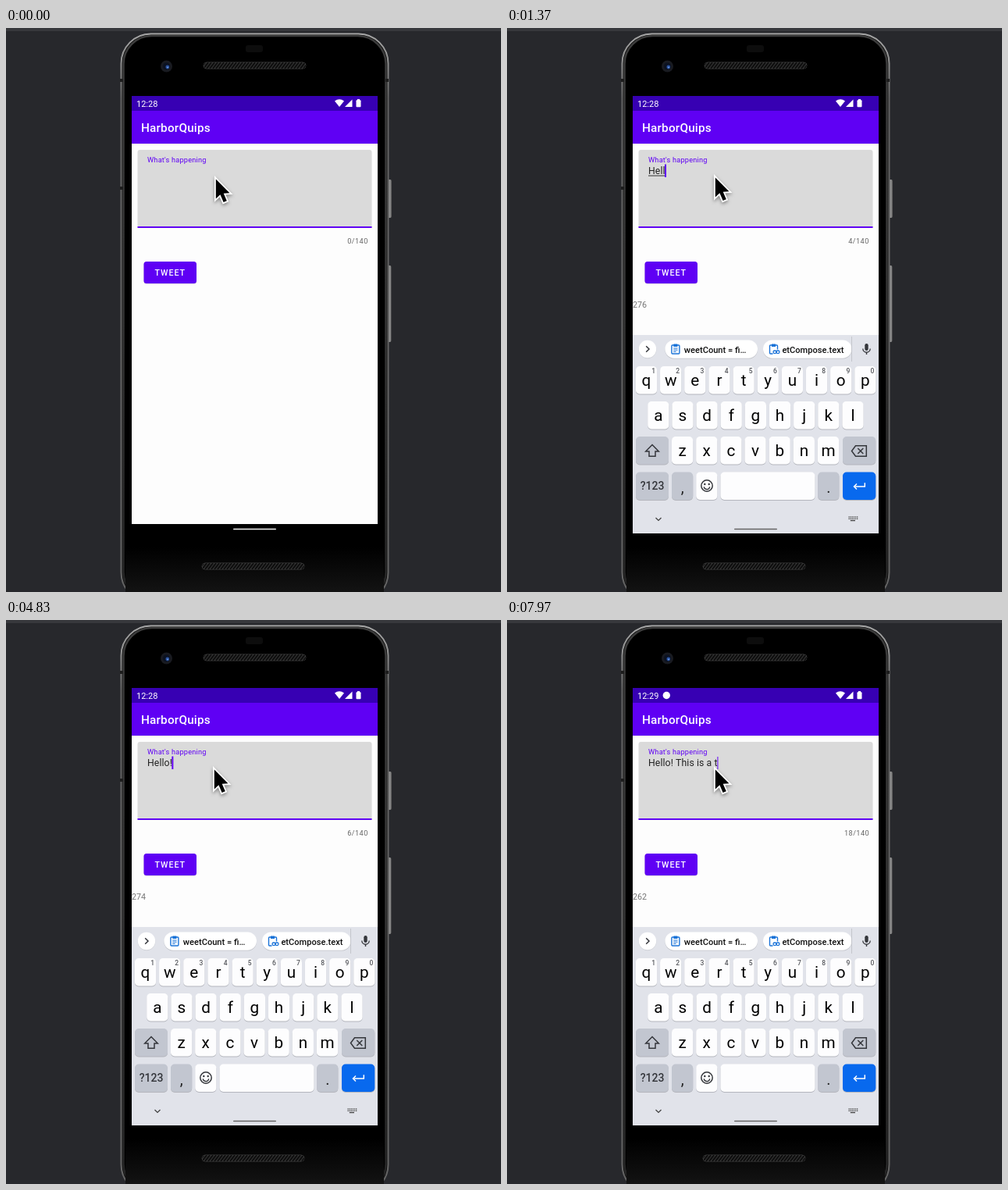
An HTML page with a canvas for the animation above (8 s loop, 634x722 px).

```html
<!DOCTYPE html>
<html lang="en">
<head>
<meta charset="utf-8">
<title>Typing on a phone</title>
<style>
html, body { margin: 0; width: 100%; height: 100%; overflow: hidden; background: #27282c; }
canvas { display: block; width: 634px; height: 722px; }
</style>
</head>
<body>
<canvas id="stage" width="634" height="722"></canvas>
<script>
const ctx = document.getElementById('stage').getContext('2d');
const LOOP = 8000;
const PURPLE = '#5f00f4';
const INK = '#34363b';
const MESSAGE = 'Hello! This is a t';
const KEY_TIMES = [500, 740, 980, 1220, 1480, 2460, 5430, 5660, 5890,
  6120, 6350, 6580, 6800, 7020, 7250, 7480, 7710, 7930];
const CLOCK_CHANGE = 7000;

const clamp = v => Math.max(0, Math.min(1, v));
const progress = (t, start, end) => clamp((t - start) / (end - start));

function rect(x, y, w, h, fill) {
  ctx.fillStyle = fill;
  ctx.fillRect(x, y, w, h);
}

function round(x, y, w, h, r, fill, stroke, width = 1) {
  ctx.beginPath();
  ctx.roundRect(x, y, w, h, r);
  if (fill) { ctx.fillStyle = fill; ctx.fill(); }
  if (stroke) { ctx.strokeStyle = stroke; ctx.lineWidth = width; ctx.stroke(); }
}

function circle(x, y, r, fill, stroke, width) {
  round(x - r, y - r, 2 * r, 2 * r, r, fill, stroke, width);
}

function arc(x, y, r, start, end, color, width) {
  ctx.beginPath();
  ctx.arc(x, y, r, start, end);
  ctx.strokeStyle = color;
  ctx.lineWidth = width;
  ctx.stroke();
}

function trace(points) {
  ctx.beginPath();
  for (let i = 0; i < points.length; i += 2) ctx.lineTo(points[i], points[i + 1]);
}

function line(points, color, width = 1.6, close = false) {
  trace(points);
  if (close) ctx.closePath();
  ctx.strokeStyle = color;
  ctx.lineWidth = width;
  ctx.stroke();
}

function polygon(points, color) {
  trace(points);
  ctx.fillStyle = color;
  ctx.fill();
}

function text(str, x, y, size, color, { weight = 400, spacing = 0, align = 'left' } = {}) {
  ctx.font = `${weight} ${size}px Roboto, sans-serif`;
  ctx.letterSpacing = spacing + 'px';
  ctx.textAlign = align;
  ctx.fillStyle = color;
  ctx.fillText(str, x, y);
  return ctx.measureText(str).width;
}

function gradient(x0, y0, x1, y1, ...colors) {
  const g = ctx.createLinearGradient(x0, y0, x1, y1);
  colors.forEach((c, i) => g.addColorStop(i / (colors.length - 1), c));
  return g;
}

function speaker(x, y) {
  round(x, y, 131, 8, 4, '#292929', '#3c3c3c');
  ctx.save();
  ctx.clip();
  for (let i = 0; i < 136; i += 4) line([x + i - 4, y + 8, x + i + 2, y], '#080808', 1.3);
  ctx.restore();
}

function drawPhone() {
  rect(0, 0, 634, 722, '#27282c');
  rect(0, 0, 634, 4, '#37383c');
  const side = gradient(489, 0, 494, 0, '#3a3a3a', '#989898', '#505050');
  round(488, 194, 6, 49, 2, side);
  round(488, 304, 5.5, 98, 2, side);

  round(147.5, 7.5, 342, 727.5, 38, '#111', gradient(0, 6, 0, 90, '#a8a8a8', '#8c8c8c', '#656565'), 2);
  round(150.5, 10, 336, 722.5, 36, '#000', gradient(0, 9, 0, 722, '#3c3c3c', '#353535', '#252525'), 2.5);
  rect(153, 664, 331, 58, gradient(0, 664, 0, 722, '#000', '#131313'));
  for (const y of [65, 203]) rect(146, y, 4, 4, '#1d1d1d');
  rect(486, 65, 4, 4, '#1d1d1d');

  round(307, 22, 22, 9, 3, '#0d0d0d');
  circle(205.5, 49, 7.5, '#191b21');
  circle(205.5, 49, 4.5, '#0b1222');
  circle(206.8, 50, 2.4, '#29509b');
  circle(207, 50.4, 0.9, '#7aa5e8');
  speaker(253, 44);
  speaker(251, 685);
}

function drawStatusBar(t) {
  const late = t >= CLOCK_CHANGE;
  rect(161, 87, 315, 19, '#3700b3');
  text(late ? '12:29' : '12:28', 167, 100.6, 11, '#fff');
  if (late) circle(204.3, 96.5, 4.7, '#fff');
  ctx.beginPath();
  ctx.moveTo(427, 101);
  ctx.lineTo(421, 93.6);
  ctx.quadraticCurveTo(427, 89, 433, 93.6);
  ctx.fillStyle = '#fff';
  ctx.fill();
  polygon([434, 101, 443.5, 101, 443.5, 91.5], '#fff');
  round(448.5, 92.2, 6, 9, 1, '#fff');
  rect(450, 91, 3, 2, '#fff');
}

// Characters entered by time t and the time since the last one.
function typed(t) {
  const count = KEY_TIMES.filter(k => k <= t).length;
  return { count, since: t - (count ? KEY_TIMES[count - 1] : 330) };
}

function drawMessage(t) {
  const { count, since } = typed(t);
  const message = MESSAGE.slice(0, count);
  const end = 181 + text(message, 181, 187.4, 12.26, '#222', { spacing: 0.1 });

  // The word being composed is underlined shortly after its first letter.
  const start = message.lastIndexOf(' ') + 1;
  const word = message.slice(start);
  if (word && !word.endsWith('!') && t - KEY_TIMES[start] > 80 && since < 900) {
    const width = ctx.measureText(word).width;
    rect(end - width, 188.6, width, 1, '#333');
  }
  if (since >= 0 && since % 1000 < 500) {
    if (since < 40) rect(end - 0.2, 175, 1, 16, PURPLE);
    else rect(end - 0.6, 174.5, 2, 16.5, PURPLE);
  }
  if (count) text(String(280 - count), 161, 358.2, 10.7, '#757575');
}

function drawApp(t) {
  rect(161, 87, 315, 548, '#fdfdfd');
  rect(161, 148, 315, 2, gradient(0, 148, 0, 150, '#e4e2ea', '#fdfdfd'));
  rect(161, 106, 315, 42, PURPLE);
  drawStatusBar(t);
  text('HarborQuips', 173, 133, 15.3, '#fff', { weight: 500, spacing: 0.19 });

  round(168.5, 156, 300, 99, [3, 3, 0, 0], '#dadada');
  rect(168.5, 254, 300, 2, PURPLE);
  text("What's happening", 181, 172, 9.2, PURPLE, { spacing: 0.21 });

  const { count } = typed(t);
  text(count + '/140', count > 9 ? 432 : 437.3, 276.3, 9.2, '#666', { spacing: 0.4 });
  round(176.5, 299.5, 67.5, 28, 3.5, '#c9c9cd');
  round(176.5, 299, 67.5, 28, 3.5, PURPLE);
  text('TWEET', 190.5, 317, 10.7, '#fff', { weight: 500, spacing: 0.96 });
  drawMessage(t - 20);
}

function key(x, y, w, color = '#fdfdfe') {
  round(x, y + 1, w, 35.5, 5, '#b4b6bd');
  round(x, y, w, 35.5, 5, color);
}

function letterRow(letters, firstCenter, y, upper) {
  [...letters].forEach((ch, i) => {
    const x = firstCenter + i * 31.15;
    key(x - 13.6, y, 27.2);
    text(upper ? ch.toUpperCase() : ch, x, y + 24.5, 20.7, '#000', { align: 'center' });
  });
}

function clipboard(x, y, linked) {
  const blue = '#1a73d8';
  round(x - 5, y - 5, 10, 11, 1, null, blue, 1.4);
  rect(x - 2.5, y - 6.5, 5, 3.5, blue);
  if (linked) {
    rect(x - 1, y + 0.5, 8, 7, '#fff');
    round(x - 0.5, y + 2, 4, 3.6, 1.8, null, blue, 1.3);
    round(x + 3.5, y + 2, 4, 3.6, 1.8, null, blue, 1.3);
  } else {
    for (const dy of [-1.5, 0.7, 2.9]) rect(x - 2.7, y + dy, dy > 2 ? 3.5 : 5.4, 1, blue);
  }
}

function chip(x, width, label, linked) {
  round(x, 400.2, width, 23.4, 11.7, '#c3c5cb');
  round(x, 399.4, width, 23.4, 11.7, '#fff');
  clipboard(x + 13.5, 411, linked);
  text(label, x + 24.4, 415.6, 11.1, '#111', { weight: 500 });
}

function drawSuggestions(t) {
  circle(180, 411.8, 11.4, '#cfd1d7');
  circle(180, 411, 11.2, '#fff');
  line([178.2, 407.2, 182, 411, 178.2, 414.8], INK, 1.5);
  ctx.globalAlpha = progress(t, 280, 380);
  chip(202.4, 118.6, 'weetCount = fi…', false);
  chip(328, 113.5, 'etCompose.text', true);
  ctx.globalAlpha = 1;
  rect(441, 395, 1, 32, '#c4c6cc');
  round(458.3, 404, 4.4, 9, 2.2, INK);
  arc(460.5, 410.5, 4.7, 0, Math.PI, INK, 1.3);
  rect(459.8, 415, 1.4, 3, INK);
}

function drawKeyboard(t) {
  const slide = 254 * (1 - progress(t, 33, 333)) ** 3;
  const upper = (t > 240 && t < 585) || (t > 5470 && t < 5740);
  const grey = '#c2c6d0';
  ctx.save();
  ctx.beginPath();
  ctx.rect(161, 87, 315, 560);
  ctx.clip();
  ctx.translate(0, slide);
  rect(161, 393, 315, 256, '#e1e3ea');
  drawSuggestions(t);

  letterRow('qwertyuiop', 178.5, 433, upper);
  for (let i = 0; i < 10; i++) {
    text((i + 1) % 10, 187.6 + i * 31.15, 441.8, 8.5, '#55575c', { weight: 500, align: 'center' });
  }
  letterRow('asdfghjkl', 193.8, 478, upper);
  letterRow('zxcvbnm', 224.6, 523, upper);

  key(165, 523, 42, grey);
  const arrow = [186, 533.5, 194.3, 542, 190, 542, 190, 548.3, 182, 548.3, 182, 542, 177.7, 542];
  if (upper) polygon(arrow, INK);
  else line(arrow, INK, 1.5, true);
  key(430, 523, 42.3, grey);
  line([446.5, 534.8, 460.3, 534.8, 460.3, 548.2, 446.5, 548.2, 441.5, 541.5], INK, 1.5, true);
  line([449.3, 538, 456.3, 545], INK, 1.5);
  line([456.3, 538, 449.3, 545], INK, 1.5);

  key(165, 568.5, 42, grey);
  text('?123', 186, 591.2, 14, INK, { weight: 500, align: 'center' });
  key(211, 568.5, 27.2, grey);
  text(',', 224.8, 595, 20, '#222', { align: 'center' });
  key(242.2, 568.5, 27.2);
  circle(256, 586, 7.2, null, INK, 1.5);
  circle(253.3, 584, 1.2, INK);
  circle(258.7, 584, 1.2, INK);
  arc(256, 586.8, 3.8, 0.15, Math.PI - 0.15, INK, 1.4);
  key(273.5, 568.5, 121);
  key(398.2, 568.5, 27.2, grey);
  text('.', 411.8, 595, 20, '#222', { align: 'center' });
  key(430, 568.5, 42.3, '#0869ee');
  line([458.3, 582.3, 458.3, 587, 444.5, 587], '#fff', 1.5);
  line([448, 583.5, 444.5, 587, 448, 590.5], '#fff', 1.5);
  ctx.restore();
}

function drawNavigation(t) {
  const dark = progress(t, 530, 720);
  const shade = target => {
    const v = Math.round(245 + (target - 245) * dark);
    return `rgb(${v},${v},${v})`;
  };
  round(291, 640.7, 55, 1.6, 0.8, shade(100));
  if (t < 100) return;
  const color = shade(66);
  line([190.5, 627, 194, 630.4, 197.5, 627], color, 1.3);
  for (let row = 0; row < 2; row++) {
    for (let i = 0; i < 6; i++) rect(437.5 + i * 2.1, 625.3 + row * 2.3, 1.3, 1.3, color);
  }
  rect(439.8, 629.9, 6.2, 1.3, color);
}

function drawPointer(t) {
  const move = progress(t, 250, 450);
  ctx.save();
  ctx.translate(268.8 - 2 * move, 193.5 - 2 * move);
  const shape = [0, 0, 0, 25, 5.6, 19.8, 9.8, 29.6, 14, 27.8, 9.9, 18.2, 17.6, 17.8];
  ctx.shadowColor = 'rgba(0,0,0,.4)';
  ctx.shadowBlur = 4;
  ctx.shadowOffsetY = 2;
  line(shape, '#fff', 3.6, true);
  ctx.shadowColor = 'transparent';
  polygon(shape, '#000');
  ctx.restore();
}

function draw() {
  const t = performance.now() % LOOP;
  drawPhone();
  drawApp(t);
  drawKeyboard(t);
  drawNavigation(t);
  drawPointer(t);
  requestAnimationFrame(draw);
}
requestAnimationFrame(draw);
</script>
</body>
</html>
```
